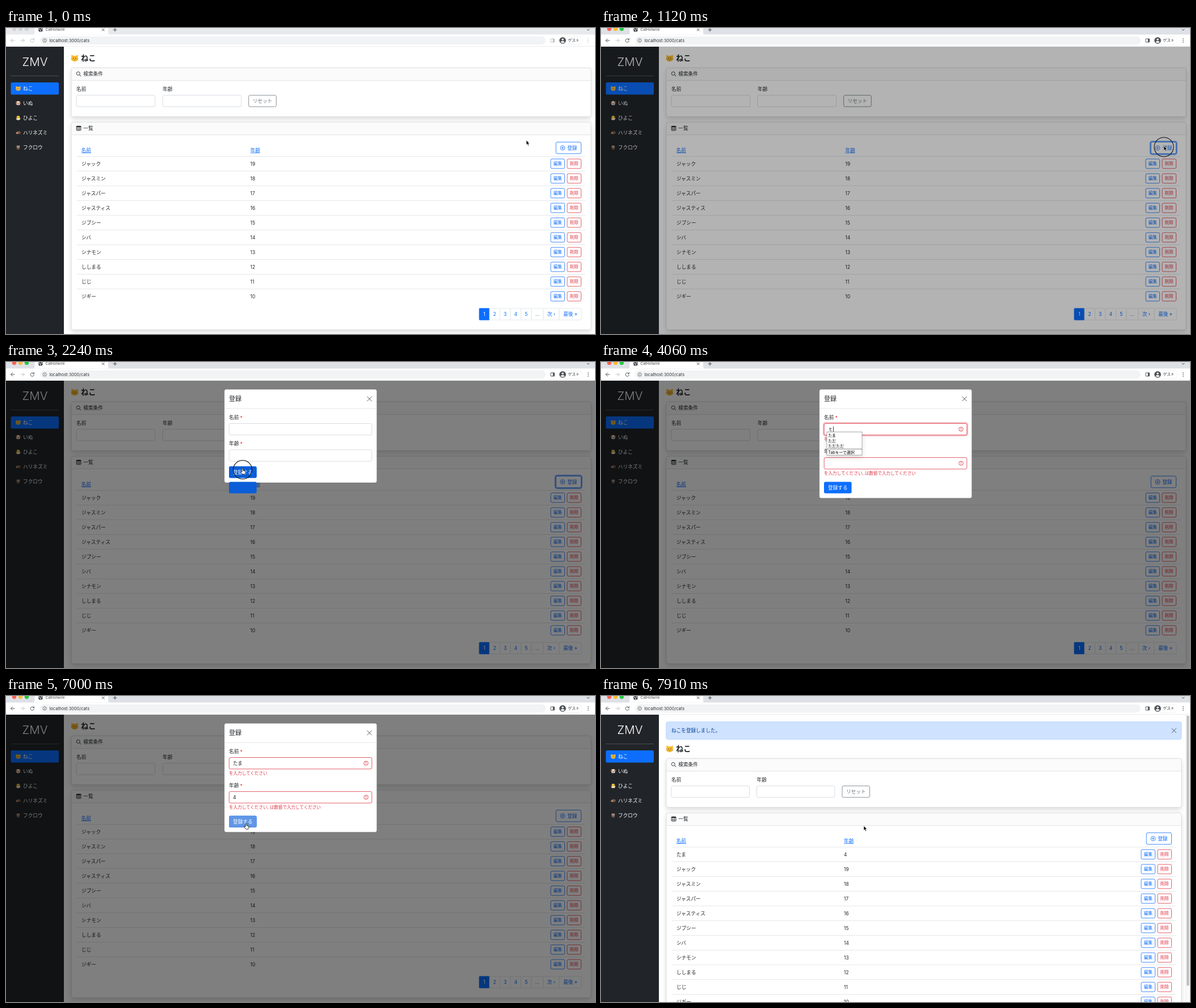
Write an HTML page that moves like this. It is 1038 px wide and 540 px high and loops after 7.98 s.

```html
<!DOCTYPE html>
<html lang="ja">
<head>
<meta charset="utf-8">
<title>CatHotwire</title>
<style>
html, body { margin: 0; width: 100%; height: 100%; overflow: hidden; background: #fff; }
svg { display: block; width: 100%; height: 100%; }
text { font-family: Inter, "Noto Sans CJK JP", "Noto Sans CJK", "Noto Sans", sans-serif; white-space: pre; }
.card { filter: drop-shadow(0 4px 4px rgba(0,0,0,.13)); }
.icon { fill: none; stroke-linecap: round; stroke-linejoin: round; }
</style>
</head>
<body>
<svg id="stage" viewBox="0 0 1038 540"></svg>
<script>
const LOOP = 7980;
const INK = '#212529', BLUE = '#0d6efd', DEEP = '#0b5ed7', RED = '#dc3545', GREY = '#6c757d', RULE = '#dee2e6';

// Drawing helpers; text is placed by its vertical centre.
const text = (x, y, s, { size = 8.65, fill = INK, weight = 400, anchor = 'start', extra = '' } = {}) =>
  `<text x="${x}" y="${y + size * .37}" font-size="${size}" fill="${fill}" font-weight="${weight}" text-anchor="${anchor}" ${extra}>${s}</text>`;
const rect = (x, y, w, h, fill, r = 0, extra = '') =>
  `<rect x="${x}" y="${y}" width="${w}" height="${h}" rx="${r}" fill="${fill}" ${extra}/>`;
const box = (x, y, w, h, stroke, fill = '#fff', r = 2.5) =>
  rect(x, y, w, h, fill, r, `stroke="${stroke}" stroke-width=".8"`);
const path = (d, stroke, w = 1, extra = '') =>
  `<path class="icon" d="${d}" stroke="${stroke}" stroke-width="${w}" ${extra}/>`;
const dot = (x, y, r, fill, extra = '') => `<circle cx="${x}" cy="${y}" r="${r}" fill="${fill}" ${extra}/>`;
const group = (attrs, body) => `<g ${attrs}>${body}</g>`;
const cross = (x, y, r, color, w) => path(`M${x - r} ${y - r}l${2 * r} ${2 * r}m0 ${-2 * r}l${-2 * r} ${2 * r}`, color, w);

// Small animal faces on a 10-unit square around the origin.
const eyes = (y = 0) => dot(-1.6, y, .65, '#333') + dot(1.6, y, .65, '#333');
const animals = {
  cat: `<path d="M-4.5 -4.8L-1.7 -3.4H1.7L4.5 -4.8L4.8 1Q4 4.7 0 4.7T-4.8 1Z" fill="#f9bd32"/>${eyes()}` +
    path('M-1 2.2Q-.4 3 0 2Q.4 3 1 2.2', '#6b4a20', .6) + path('M-5 1.5l2 .4M5 1.5l-2 .4', '#8a6a35', .4),
  dog: dot(0, 0, 4.3, '#f3ede4') + '<ellipse cx="-3.7" cy="-1" rx="1.3" ry="3" fill="#a8673c"/><ellipse cx="3.7" cy="-1" rx="1.3" ry="3" fill="#a8673c"/>' +
    eyes(-.6) + dot(0, 1.5, 1.1, '#333') + dot(0, 3.3, .8, '#e8697d'),
  chick: dot(0, -1.2, 3.4, '#fdd23c') + eyes(-1.8) + '<path d="M-1 -.8H1L0 .6Z" fill="#ee7a22"/><path d="M-4.6 .4L-2.8 1.8L-1 .6L1 1.8L2.8 .6L4.6 .4Q4.2 4.6 0 4.6T-4.6 .4Z" fill="#f4e3c3"/>',
  hedgehog: '<ellipse cx=".6" cy="0" rx="4.4" ry="3" fill="#7b5646"/><ellipse cx="-2.6" cy="1" rx="2.3" ry="1.6" fill="#c99b78"/>' + dot(-4.6, 1, .6, '#222') + dot(-2.6, .4, .4, '#222'),
  owl: '<path d="M-3 -4.6Q0 -3 3 -4.6L3.4 2Q2 4.8 0 4.8T-3.4 2Z" fill="#7c5a4a"/>' + dot(-1.4, -1.4, 1.3, '#eee') + dot(1.4, -1.4, 1.3, '#eee') +
    dot(-1.4, -1.4, .6, '#222') + dot(1.4, -1.4, .6, '#222') + '<path d="M-.6 -.2H.6L0 1Z" fill="#f0a52c"/>'
};
const animal = (kind, x, y, k) => group(`transform="translate(${x} ${y}) scale(${k})"`, animals[kind]);

function browser(id, active) {
  const nav = active ? '#55585c' : '#bfc2c6', dim = '#bfc2c6';
  const lights = active ? ['#ff5f57', '#febc2e', '#28c840'] : ['#d3d4d7', '#d3d4d7', '#d3d4d7'];
  return group(`id="${id}"`,
    rect(0, 0, 1038, 33, '#fff') + rect(0, 0, 1038, 11.5, active ? '#dee1e6' : '#e7e9ed') +
    '<path d="M47 11.5Q50.5 11.5 50.5 8V0H180V8Q180 11.5 183.500 11.5Z" fill="#fff"/>' +
    lights.map((c, i) => dot(14.5 + 11 * i, 1.5, 3.7, c)).join('') +
    dot(61, 3, 3.9, '#4a4d51') + path('M58.500 1.500q2 .5 2 2t1 3M62 0q0 2 2 3', '#fff', 1) +
    text(69.5, 3, 'CatHotwire', { size: 6.4, fill: '#45494d' }) + cross(171.3, 3.2, 1.9, '#45494d', .9) +
    path('M189 3.2h6m-3 -3v6', '#45494d', 1) + path('M1024 2.200l2 2l2 -2', '#45494d', 1) +
    path('M15 22H8.500m3 -3l-3 3l3 3', nav, 1) + path('M26 22h6.500m-3 -3l3 3l-3 3', dim, 1) +
    path('M49.100 20.400A3.200 3.200 0 1 0 49.500 23M49.500 18.600V20.800H47.300', nav, 1) +
    rect(60, 14.8, 891, 14.4, '#f1f3f4', 7.2) +
    dot(68.2, 22, 3.2, 'none', 'stroke="#5f6368" stroke-width=".8"') + path('M68.200 21.800v1.700m0 -3.300v.1', '#5f6368', .9) +
    text(76.5, 22, 'localhost:3000/cats', { size: 7.5, fill: '#303336' }) +
    rect(960, 19, 6.5, 6, 'none', .5, `stroke="${nav}"`) + rect(963.7, 19, 2.8, 6, nav) +
    rect(974, 14.8, 42, 14.4, '#fff', 7.2, 'stroke="#eceef0" stroke-width=".7"') + dot(981, 22, 5.8, '#4b4f54') +
    dot(981, 20.3, 1.7, '#fff') + '<path d="M977.600 25.300Q978 23 981 23T984.400 25.300Q981 27.500 977.600 25.300Z" fill="#fff"/>' +
    text(990.5, 22, 'ゲスト', { size: 6.7, fill: '#303336' }) +
    [19, 22, 25].map(y => dot(1026, y, .85, nav)).join('') +
    rect(0, 32, 1038, .7, '#e2e4e7'));
}

function sidebar() {
  const items = [['cat', 'ねこ'], ['dog', 'いぬ'], ['chick', 'ひよこ'], ['hedgehog', 'ハリネズミ'], ['owl', 'フクロウ']];
  return rect(0, 32.5, 102, 508, '#212529') +
    text(51, 59, 'ZMV', { size: 20.5, fill: '#fff', weight: 300, anchor: 'middle' }) +
    rect(8.5, 84, 84.5, .8, '#595c60') + rect(8.5, 96, 84.5, 21.5, BLUE, 2.6) +
    items.map(([kind, name], i) => animal(kind, 21.5, 106.6 + 26 * i, .86) +
      text(30, 106.4 + 26 * i, name, { fill: '#fff' })).join('');
}

const cats = ['ジャック', 'ジャスミン', 'ジャスパー', 'ジャスティス', 'ジプシー', 'シバ', 'シナモン', 'ししまる', 'じじ', 'ジギー']
  .map((name, i) => [name, 19 - i]);

const card = (y, h, w) => group('class="card"', box(115, y, w, h, '#d4d6d8', '#fff', 3.5)) +
  rect(115.4, y + .4, w - .8, 21.6, '#000', 3, 'fill-opacity=".015"') + rect(115, y + 22, w, .8, '#d9dbdd');

const smallButton = (x, y, s, color) => box(x, y - 8.4, 24.5, 16.8, color, '#fff', 2.2) +
  text(x + 12.25, y, s, { size: 7.6, fill: color, anchor: 'middle' });

function addButton(x, color, fill) {
  return box(x, 201.3, 44.3, 20.5, BLUE, fill) + dot(x + 11.8, 211.6, 4, 'none', `stroke="${color}" stroke-width=".8"`) +
    path(`M${x + 9.8} 211.600h4m-2 -2v4`, color, .8) + text(x + 20, 211.6, '登録', { fill: color });
}

function pager(shift) {
  const edges = [834, 852, 870.5, 889, 907.5, 926, 947, 975, 1014];
  return ['1', '2', '3', '4', '5', '…', '次 ›', '最後 »'].map((s, i) => {
    const x = edges[i] - shift, w = edges[i + 1] - edges[i];
    return box(x, 494.8, w, 20.4, i ? RULE : BLUE, i ? '#fff' : BLUE, 1) +
      text(x + w / 2, 505, s, { fill: i === 0 ? '#fff' : i === 5 ? GREY : BLUE, anchor: 'middle' });
  }).join('');
}

function content(id, { notice, scroll, rows, extra = '' }) {
  const s = scroll ? 8 : 0, w = 916 - s, more = (rows.length - 10) * 26;
  const field = scroll ? 137.5 : 138.7, x2 = scroll ? 274.5 : 276, reset = scroll ? 425 : 427.7, age = scroll ? 428 : 430.5;
  const link = { fill: BLUE, extra: 'text-decoration="underline"' };
  const list = rows.map(([name, n], i) => {
    const y = 239.5 + 26 * i;
    return rect(125, y - 13.3, 896 - s, .8, RULE) + text(133, y, name) + text(age, y, n, { size: 8.4 }) +
      smallButton(960 - s, y, '編集', BLUE) + smallButton(989 - s, y, '削除', RED);
  }).join('');
  const alert = !notice ? '' : box(114.8, 45.5, w + .2, 31, '#b6d4fe', '#cfe2ff', 3) +
    text(124, 61, 'ねこを登録しました。', { fill: '#084298' }) + cross(1017.8 - s, 61, 3.8, '#4b5a70', 1);
  const bar = !scroll ? '' : rect(1030.5, 32.5, 7.5, 508, '#fafafa') + rect(1030.5, 32.5, .6, 508, '#e6e6e6') + rect(1032, 34.5, 4.6, 477, '#c1c1c1', 2.3);
  return group(`id="${id}"`, alert + group(`transform="translate(0 ${notice ? 40 : 0})"`,
    animal('cat', 121, 53.3, 1.25) + text(132, 53, 'ねこ', { size: 13.2, weight: 700 }) +
    card(70.3, 86.2, w) + dot(127.3, 80.3, 3, 'none', `stroke="${INK}" stroke-width=".9"`) + path('M129.600 82.600l2.400 2.400', INK, 1) +
    text(136.3, 81.2, '検索条件') + text(124, 107.5, '名前') + text(x2, 107.5, '年齢') +
    box(124, 118.7, field, 20.2, '#ced4da') + box(x2, 118.7, field, 20.2, '#ced4da') +
    box(reset, 118.7, 48.6, 20.2, GREY) + text(reset + 24.3, 128.8, 'リセット', { fill: GREY, anchor: 'middle' }) +
    card(166.2, 366.3 + more, w) + rect(124.2, 173.2, 7.8, 7.6, '#fff', .8, `stroke="${INK}" stroke-width=".9"`) +
    rect(124.2, 173, 7.8, 2.2, INK) + path('M124.500 178.100h7.200M126.800 175v5.500M129.400 175v5.500', INK, .7) +
    text(136.3, 177, '一覧') + text(132.7, 215.6, '名前', link) + text(age, 215.6, '年齢', link) +
    addButton(969.2 - s, BLUE, '#fff') + extra + list + group(`transform="translate(0 ${more})"`, pager(s))) + bar);
}

function form(id, invalid) {
  const gap = invalid ? 13.7 : 0, end = invalid ? 27.2 : 0;
  const label = (y, s) => text(393, y, s) + text(412.8, y + .6, '*', { fill: 'red', size: 8 });
  const input = y => box(393.2, y, 251.6, 20.3, invalid ? RED : '#ced4da') + (!invalid ? '' :
    dot(634.5, y + 10.1, 3.7, 'none', `stroke="${RED}" stroke-width=".9"`) + path(`M634.500 ${y + 8.2}v2.200m0 1.600v.1`, RED, .9));
  const error = (y, s) => invalid ? text(393, y, s, { size: 7.55, fill: RED }) : '';
  const y = 184.2 + end;
  return group(`id="${id}"`, box(384.8, 48.2, 268.7, 164.8 + end, 'rgba(0,0,0,.2)', '#fff', 3.5) +
    text(393, 65, '登録', { size: 11, weight: 500 }) + cross(640.5, 65, 3.8, '#555', 1) + rect(385, 81.7, 268.5, .8, RULE) +
    label(97.5, '名前') + input(108.5) + error(136.6, 'を入力してください') +
    label(143.8 + gap, '年齢') + input(154.9 + gap) + error(196.6, 'を入力してください, は数値で入力してください') +
    rect(393, y, 48.6, 20.3, BLUE, 2.5) + rect(393, y, 48.6, 20.3, DEEP, 2.5, 'class="hover"') +
    text(417.3, y + 10.2, '登録する', { fill: '#fff', anchor: 'middle', weight: 500 }) +
    rect(393, y, 48.6, 20.3, '#fff', 2.5, 'class="disabled" fill-opacity=".35"'));
}

const glow = (id, y) => rect(392, y - 1.2, 254, 22.7, 'none', 3.5, `id="${id}" stroke="${RED}" stroke-opacity=".3" stroke-width="2.4"`);
const caret = (id, x, y) => rect(x, y - 5, .8, 10, '#111', 0, `id="${id}"`);
const underline = (x, y, w) => rect(x, y + 5, w, .6, '#333');

const popup = group('id="popup"', group('class="card"', rect(398, 123.6, 62, 40.6, '#fff', 0, 'stroke="#888" stroke-width=".7"')) +
  ['たま', 'ただ', 'ただただ'].map((s, i) => text(400.3, 129.2 + 9.8 * i, s, { size: 7, fill: '#000' })).join('') +
  rect(398, 153.4, 62, .7, '#555') + text(400.3, 159.3, 'Tabキーで選択', { size: 7, fill: '#000' }));

const entries = glow('glowName', 108.5) + glow('glowAge', 168.6) +
  group('id="typedT"', text(400, 118.6, 'ｔ') + underline(400, 118.6, 8.6)) +
  group('id="typedTa"', text(400, 118.6, 'た') + underline(400, 118.6, 8.6)) +
  group('id="typedTama"', text(400, 118.6, 'たま')) + text(400, 178.7, '4', { extra: 'id="typedAge"' }) +
  caret('caretStart', 400, 118.6) + caret('caretOne', 409, 118.6) + caret('caretTwo', 418, 118.6) +
  caret('caretAge', 400, 178.7) + caret('caretAgeEnd', 406.5, 178.7) + popup;

const pointer = group('id="pointer"',
  dot(0, 2, 6, 'none', 'id="ring" stroke="#111" stroke-width="1.1"') +
  '<path id="arrow" d="M0 0V8.200L1.800 6.600L3.200 9.700L4.600 9.100L3.200 6.100H5.600Z" fill="#000" stroke="#fff" stroke-width=".6"/>' +
  '<path id="hand" d="M-1 .8Q-1 -.4 0 -.4T1 .8V3.600L4 4.300Q5.200 4.700 5 6L4.500 8.600Q4.200 10 3 10H.4Q-.6 10 -1.200 9L-3 6.200Q-3.200 4.600 -1.800 5.200L-1 5.900Z" fill="#fff" stroke="#000" stroke-width=".8"/>' +
  path('M-1.500 -4q1.500 0 1.500 1v6q0 1 1.500 1m-3 0q1.500 0 1.500 -1v-6q0 -1 1.500 -1', '#222', .8, 'id="beam"'));

const addStates = group('id="addHover"', addButton(969.2, '#fff', BLUE)) +
  rect(968, 200.1, 46.7, 22.9, 'none', 3.5, `id="addFocus" stroke="${BLUE}" stroke-opacity=".55" stroke-width="2.400"`);

document.getElementById('stage').innerHTML =
  '<clipPath id="view"><rect y="32.5" width="1038" height="508"/></clipPath>' + rect(0, 0, 1038, 540, '#fff') +
  group('clip-path="url(#view)"',
    sidebar() +
    content('before', { rows: cats, extra: addStates }) +
    content('added', { rows: [['たま', 4], ...cats], notice: true }) +
    content('after', { rows: [['たま', 4], ...cats], notice: true, scroll: true }) +
    rect(0, 32, 1038, 508, '#000', 0, 'id="backdrop"') +
    group('id="fade"', group('id="slide"', form('empty', false) + group('id="filled"', form('invalid', true) + entries)))) +
  browser('idle', false) + browser('active', true) + pointer;

// Timeline: every track becomes one looping CSS animation.
const sheet = [];
function track(sel, prop, stops, ease = 'linear') {
  const name = 'k' + sheet.length;
  const all = [[0, stops[0][1]], ...stops, [LOOP, stops[stops.length - 1][1]]];
  const frames = all.map(([ms, value, fn]) =>
    `${(ms / LOOP * 100).toFixed(3)}%{${prop}:${value};${fn ? `animation-timing-function:${fn}` : ''}}`).join('');
  sheet.push(`@keyframes ${name}{${frames}}${sel}{animation:${name} ${LOOP}ms ${ease} infinite}`);
}
const show = (sel, ...spans) => track(sel, 'visibility',
  [[0, 'hidden'], ...spans.flatMap(([from, to]) => [[from, 'visible'], [to, 'hidden']])], 'step-end');

const OPEN = 1172, SENT = 2450, DONE = 7065, CLOSED = 7520;
show('#idle', [0, 140]);
show('#active', [140, LOOP]);
show('#before', [0, DONE]);
show('#added', [DONE, CLOSED]);
show('#after', [CLOSED, LOOP]);
show('#addHover', [700, 1110]);
show('#addFocus', [1110, 2310]);
track('#backdrop', 'opacity', [[1035, 0], [1180, .5], [7370, .5], [CLOSED, 0]]);
track('#fade', 'opacity', [[OPEN, 0], [OPEN + 150, 1], [DONE, 1], [DONE + 150, 0]]);
track('#slide', 'transform', [[OPEN, 'translateY(-32px)', 'ease-out'], [OPEN + 270, 'translateY(0px)'],
  [DONE, 'translateY(0px)', 'ease-out'], [DONE + 300, 'translateY(-32px)']]);
show('#empty', [OPEN, SENT]);
show('#invalid', [SENT, DONE + 300]);
show('.hover', [2050, SENT], [6720, DONE]);
show('.disabled', [2320, SENT], [6960, DONE]);

show('#glowName', [3460, 4830]);
show('#glowAge', [4830, 6880]);
show('#caretStart', [3460, 3960]);
show('#typedT', [3960, 4270]);
show('#typedTa', [4270, 4410]);
show('#caretOne', [3960, 4410]);
show('#typedTama', [4410, DONE + 300]);
show('#caretTwo', [4410, 4830]);
show('#popup', [3990, 4620]);
show('#caretAge', [4830, 5250]);
show('#typedAge', [5250, DONE + 300]);
show('#caretAgeEnd', [5250, 5900], [6400, 6880]);

const at = (x, y) => `translate(${x}px,${y}px)`, glide = 'ease-in-out';
track('#pointer', 'transform', [[260, at(917, 198), glide], [740, at(992, 208)], [1600, at(992, 208), glide],
  [2090, at(417, 188)], [2600, at(417, 188), glide], [3200, at(440, 119)], [6440, at(440, 119), glide],
  [6760, at(423, 225)], [7270, at(423, 225), glide], [7720, at(463, 229)]]);
show('#arrow', [0, 2050], [2690, 2950], [6540, 6700], [DONE + 20, LOOP]);
show('#hand', [2050, 2690], [6700, DONE + 20]);
show('#beam', [2950, 3900], [6440, 6540]);

const clicks = [1000, 2155, 3430, 6840];
track('#ring', 'r', clicks.flatMap(ms => [[ms, '6px'], [ms + 90, '17px'], [ms + 150, '17px'], [ms + 151, '6px']]));
sheet.push('#ring{opacity:0}');
const ringStops = clicks.flatMap(ms => [[ms, 1], [ms + 150, 0]]);
track('#pointer #ring', 'opacity', [[0, 0], ...ringStops], 'step-end');
// The ring needs both its growth and its visibility at once.
const last = sheet.length - 1;
sheet.push(`#pointer #ring{animation:k${last - 2} ${LOOP}ms linear infinite,k${last} ${LOOP}ms step-end infinite}`);

document.head.appendChild(document.createElement('style')).textContent = sheet.join('\n');
</script>
</body>
</html>
```
